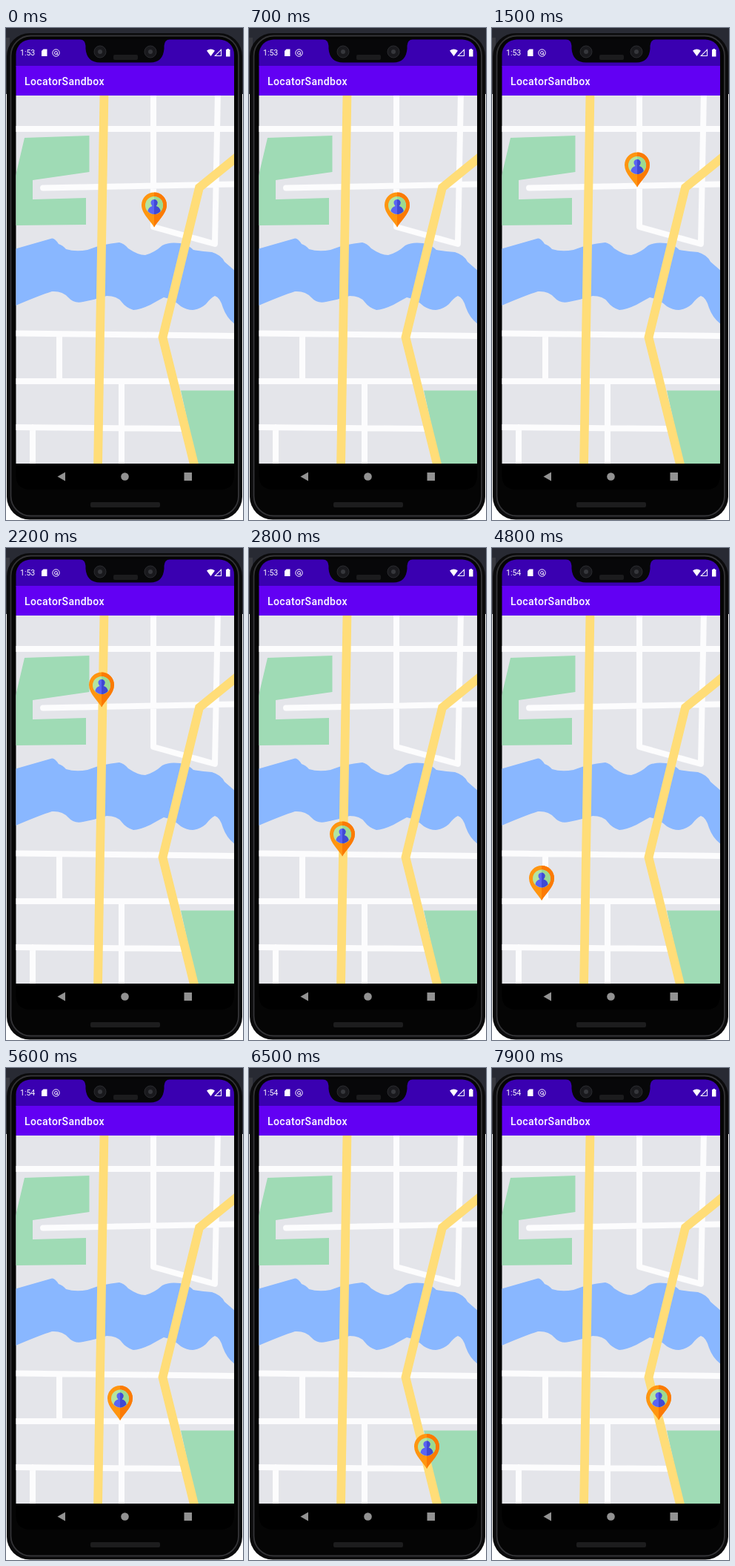
An HTML page for the animation above (8000 ms loop, 320 by 663 pixels).

```html
<!DOCTYPE html>
<html lang="en">
<head>
<meta charset="utf-8">
<title>Map marker</title>
<style>
html, body { margin: 0; width: 100%; height: 100%; overflow: hidden; background: #fff; }
svg { display: block; width: 320px; height: 663px; }
text { font-family: Roboto, sans-serif; fill: #fff; }
.road { fill: none; stroke: #fcfcfd; stroke-width: 8; stroke-linecap: round; stroke-linejoin: round; }
.main { fill: none; stroke: #ffdd78; stroke-width: 11.8; }
.park { fill: #9fdbb5; }
</style>
</head>
<body>
<svg viewBox="0 0 320 663">
  <defs>
    <clipPath id="map"><path d="M13.5 91H308V587H13.5Z"/></clipPath>
    <clipPath id="screen"><rect x="13.500" y="15.500" width="294.500" height="640" rx="20"/></clipPath>
    <clipPath id="right"><path d="M0-50H20V2H0Z"/></clipPath>
    <path id="drop" d="M0 0C-4-8-17-18-17-30A17 17 0 0 1 17-30C17-18 4-8 0 0Z"/>
    <path id="person" d="M-2.500-28.500Q-5-31-4.500-34Q-3.500-37.500 0-37.500Q3.500-37.500 4.500-34Q5-31 2.500-28.500Q8-27 8.500-21.500Q4.500-17.500 0-17.500Q-4.500-17.500-8.500-21.500Q-8-27-2.500-28.500Z"/>
  </defs>

  <!-- Phone body -->
  <path d="M0 0H320V89H0Z" fill="#282a33"/>
  <path d="M0 13H5V89H0Z" fill="#393a40"/>
  <rect x="1" y="7" width="318" height="655.500" rx="31" fill="#0b0b0c"/>
  <rect x="6.500" y="10.500" width="307.500" height="647" rx="27" fill="#050505" stroke="#343437" stroke-width="1.800"/>
  <rect x="114" y="639" width="94" height="7" rx="2" fill="#1d1d1e"/>

  <!-- Bars -->
  <g clip-path="url(#screen)">
    <path d="M13 15H309V52H13Z" fill="#3a00b1"/>
    <path d="M13 51H309V91H13Z" fill="#6200f3"/>
  </g>
  <path d="M100 15Q107 16 107.500 24V28Q109 46.500 127 46.500H195Q212 46.500 213.500 28V24Q214 16 221 15Z" fill="#070709"/>
  <rect x="145" y="36" width="33" height="7" rx="2" fill="#1b1b1d"/>
  <g fill="#19191d" stroke="#2a2b2f">
    <circle cx="127" cy="32" r="8"/><circle cx="195" cy="32" r="8"/>
  </g>
  <g fill="#36373c"><circle cx="127" cy="32" r="3"/><circle cx="195" cy="32" r="3"/></g>
  <text id="clock" x="19" y="37" font-size="10.500">1:53</text>
  <g fill="#fff">
    <path d="M50.500 28.500H55.500V38H48V31Z"/>
    <path d="M271 30.500Q276.500 26.500 282 30.500L276.500 38Z"/>
    <path d="M291 28V38H281Z"/>
    <path d="M298.500 28H301V29H302.500V38.500H297V29H298.500Z"/>
  </g>
  <path d="M290 30.500V37H283.500Z" fill="#3a00b1"/>
  <g fill="none" stroke="#fff">
    <circle cx="67.500" cy="33.500" r="4.700"/><circle cx="67.500" cy="33.500" r="2"/>
    <path d="M68 34L71 37"/>
  </g>
  <text x="25" y="76.500" font-size="14" font-weight="500" letter-spacing=".4">LocatorSandbox</text>

  <!-- Map -->
  <g clip-path="url(#map)">
    <path d="M13 91H309V588H13Z" fill="#e4e5ea"/>
    <path class="park" d="M25 148L112.500 145V194L36 205V231L108 229V265L13 266V199ZM236 488.500H309V588H258Z"/>
    <path d="M13 297.500L62 283.500Q66 283 71 291Q77 293 81 298Q94 302 110 299Q130 291 153 289Q159 290 165 297Q178 306 188 306Q200 303 211 293Q220 288 235 290Q246 292 253 299Q267 301 278 302Q291 306 295 315L309 327V399Q298 391 293 377Q289 363 282 361Q276 364 270 372Q262 379 252 380Q244 380 236 375Q225 365 213 363Q202 369 195 373Q180 380 172 380Q162 377 156 369Q150 361 136 361Q120 366 104 369Q92 372 84 363Q76 354 62 355Q46 360 13 374Z" fill="#89b7ff"/>
    <path class="road" d="M10 136H312M199 88V268L282 291L286 88M50 215.500L312 210.500
      M10 411.500L312 415M72 414V474M10 476H312M156 476V592M10 538L238 540M36 538V592"/>
    <path class="main" d="M132.500 88L124 592M314 172L261 215L211.500 417L255 592"/>
  </g>

  <g id="pin">
    <use href="#drop" fill="#ff9510"/>
    <use href="#drop" fill="#fb7a05" clip-path="url(#right)"/>
    <circle cy="-29.500" r="12" fill="#b4e5a0"/>
    <path d="M0-41.500A12 12 0 0 1 0-17.500Z" fill="#9bda91"/>
    <use href="#person" fill="#5964f3"/>
    <use href="#person" fill="#4049d3" clip-path="url(#right)"/>
  </g>

  <!-- Navigation bar -->
  <path d="M13.500 587H308V603Q308 622 289 622H33Q13.500 622 13.500 603Z" fill="#000"/>
  <g fill="#929292">
    <path d="M69.500 604.500L80 598.500V610.500Z"/>
    <circle cx="160.500" cy="604.500" r="5.300"/>
    <path d="M240.500 599H251V610H240.500Z"/>
  </g>
</svg>
<script>
const LOOP = 8000, STEP = 800, FIRST_STEP = 850, MINUTE_TURN = 3200;
// Tip of the marker at each location update
const stops = [
  [200, 268.5], [196, 214.5], [129, 214.5], [126, 415.5], [73, 412.5],
  [67, 475], [154, 475], [154, 540], [240, 540], [225, 474.5]
];
const pin = document.getElementById('pin');
const clock = document.getElementById('clock');

function draw(now) {
  const t = now % LOOP;
  const stop = Math.max(0, Math.floor((t - FIRST_STEP) / STEP) + 1);
  pin.setAttribute('transform', `translate(${stops[Math.min(stop, stops.length - 1)]})`);
  clock.textContent = t < MINUTE_TURN ? '1:53' : '1:54';
}

const start = performance.now();
function tick() {
  draw(performance.now() - start);
  requestAnimationFrame(tick);
}
tick();
</script>
</body>
</html>
```
